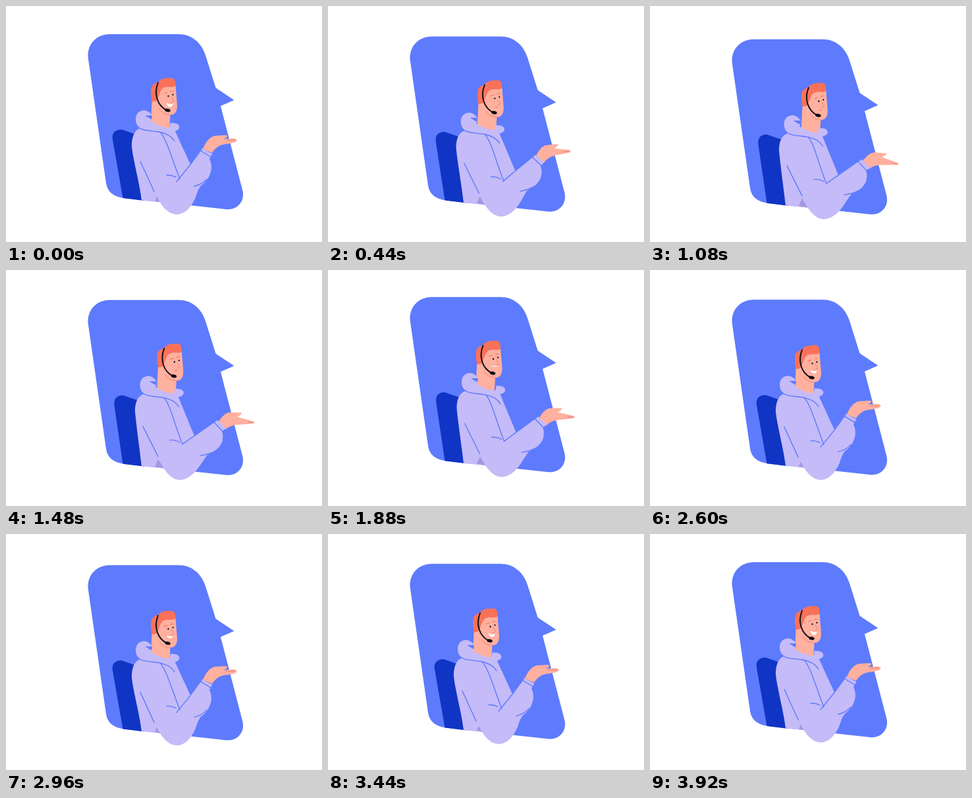
Write an HTML page with a canvas that moves like this. It is 480 px wide and 360 px high and loops after 3.96 s.

```html
<!DOCTYPE html>
<html lang="en">
<head>
<meta charset="utf-8">
<title>Support agent</title>
<style>
  html, body { margin: 0; width: 480px; height: 360px; overflow: hidden; background: #fff; }
  canvas { display: block; }
</style>
</head>
<body>
<canvas id="stage" width="480" height="360"></canvas>
<script>
const LOOP = 3960;
const BLUE = '#5e7bfd', NAVY = '#1035c4', LILAC = '#c5bbf8', DUSK = '#a397e3';
const SKIN = '#ffb09f', HAIR = '#fa7159', SHADE = '#e9776a', BLACK = '#0b0b12';
const ctx = document.getElementById('stage').getContext('2d');
ctx.lineCap = ctx.lineJoin = 'round';

// Keyframe pairs [time, value], sine-eased between neighbours.
const tracks = {
  bob:   [[0, 0], [960, 8], [1960, -2], [3000, 4.4], [LOOP, 0]],
  reach: [[0, 0], [680, 1], [1760, 1], [2400, 0], [LOOP, 0]],
  headX: [[0, 0], [680, 9.5], [1300, 10], [2400, 0], [LOOP, 0]],
  headY: [[0, 0], [1880, 0], [2400, 2.5], [3000, 3], [3800, 0], [LOOP, 0]],
  wrist: [[0, 0], [420, -9], [1040, 0], [1780, -6], [2300, 0], [LOOP, 0]],
  smile: [[0, 1], [300, 0], [1700, 0], [2200, 1], [2960, 0.6], [3700, 1], [LOOP, 1]]
};

function sample(keys, t) {
  const i = keys.findIndex(k => k[0] > t);
  const [t0, a] = keys[i - 1], [t1, b] = keys[i];
  return a + (b - a) * (1 - Math.cos(Math.PI * (t - t0) / (t1 - t0))) / 2;
}

// Blends two path strings that share the same commands.
function morph(from, to, k) {
  const ends = to.match(/[\d.]+/g);
  let i = 0;
  return from.replace(/[\d.]+/g, n => +n + (ends[i++] - n) * k);
}

function fill(path, color) {
  ctx.fillStyle = color;
  ctx.fill(new Path2D(path));
}

function line(path, color = BLUE, width = 1.4) {
  ctx.strokeStyle = color;
  ctx.lineWidth = width;
  ctx.stroke(new Path2D(path));
}

function oval(x, y, rx, ry, color, angle = 0) {
  ctx.fillStyle = color;
  ctx.beginPath();
  ctx.ellipse(x, y, rx, ry, angle, 0, 7);
  ctx.fill();
}

function shifted(x, y, paint) {
  ctx.save();
  ctx.translate(x, y);
  paint();
  ctx.restore();
}

function drawHead(smile) {
  fill('M222 138L220 178C228 186 240 189 248 189L250 160Z', SKIN);
  fill('M229 126L257.5 121L260 152C260 160 257 166 250 166C240 165 230 154 227 140Z', SKIN);
  line('M233 157C237 163 242 166 249 166', SHADE, 0.8);
  fill('M222 146C220 138 219 126 222 121.5C224 119 227 117.5 231 116C234 112 240 109.5 247 110C252 109 256 110 257 115L257.5 122C251 126 245 121 239 125C233 129 232 140 228 145Z', HAIR);
  line('M240.5 133.5L245 132M250 130.5L254 129.5', HAIR, 1.2);
  line('M251 139C253 142 256 145 254 146L251 147', SHADE, 0.9);
  oval(246.5, 137.5, 1.1, 1.3, BLACK);
  oval(253.5, 135.3, 1, 1.2, BLACK);
  if (smile < 0.1) line('M247 151L251 150.5', SHADE, 0.9);
  shifted(0, 147.5, () => {
    ctx.scale(1, smile);
    fill('M243.5 0C247 2 249 3 253.5 1.5C253 9 245 8 243.5 0Z', '#fff');
  });
  line('M231 117C224 134 230 152 244 159', BLACK, 1.9);
  oval(245.5, 159.2, 4.4, 2.4, BLACK, 0.2);
}

function drawHood() {
  fill('M222 167C214 154 197 158 197 173C197 184 205 188 216 190C235 191 246 193 256 191C266 189 265 181 258 179L250 178L248 186C238 185 228 181 221 176Z', LILAC);
  fill('M211 167L222 167L221 173Z', BLUE);
  line('M204 187C213 191 222 190 232 192C244 194 251 198 256 206');
}

function drawHand(reach, wrist) {
  const x = 306 + 20 * reach, y = 220 + 16 * reach;
  shifted(x, y, () => {
    ctx.rotate(wrist * Math.PI / 180);
    ctx.translate(-x, -y);
    fill(morph(
      'M299 218C303 208 309 200 317 198L334 197C338 198 336 201 330 203L346 202C352 203 352 207 346 208.5L336 210.5C326 211 320 214 313 224Z',
      'M320 232C326 226 331 217 340 215.5L358 217C361 218 358 221 352 223L373 230.5C379 232 379 234.5 374 235L356 235C348 235 341 235 333 241Z',
      reach), SKIN);
    line(morph('M335 205L348 204.5', 'M368 232L376 233.5', reach), SHADE, 0.9);
  });
}

function drawBody(reach) {
  const blend = (a, b) => morph(a, b, reach);
  fill(blend(
    'M207 186C194 187 191 202 191 214C193 235 203 270 206 296.5L240 300L285 290L292 262L280 241.5L256 189Z',
    'M212 186C198 188 196 203 196 213C198 235 203 270 206 296.5L240 300L291 290L299 262L286 250L261 189Z'), LILAC);
  fill(blend('M229 290L226 297.5L234 299Z', 'M231 286L226 297.5L240 299.5Z'), DUSK);
  fill(blend(
    'M215 240L229 290C235 303 245 318 260 318C275 317 283 303 288 292C290 284 293 278 296 274C306 268 312 255 312 246C312 240 310 235 309 233L313.5 225.5L297.5 217L280 241.5L255 200Z',
    'M220 238L233 287C239 301 250 317.5 264 317.5C279 317 289 304 295 295C299 289 303 283 306 279C318 275 329 264 329 255C330 249 329 246 328 244L334 238L321 226L286 250L261 200Z'), LILAC);
  line(blend('M204 237L225 283', 'M208 236L231 282'));
  line(blend('M233 191C243 200 252 233 264 264', 'M240 192C250 203 258 240 268 263'));
  line(blend('M244 258C249 258 254 259 258 261', 'M249 257C254 256 260 258 264 260'));
  line(blend('M259 268L280 242L297 218.5', 'M268 263L286 250.5L320 226.5'));
  line(blend('M293.5 219.5L311 230', 'M316 229.5L329.5 244'));
  line(blend('M286 275C294 273 301 269 305 264', 'M295 280.5C304 279 312 277 318 273.5'));
}

function render(t) {
  const at = name => sample(tracks[name], t);
  const reach = at('reach');
  ctx.fillStyle = '#fff';
  ctx.fillRect(0, 0, 480, 360);
  shifted(0, at('bob'), () => {
    fill('M158 43L262 43C282 43 297 56 303 75L318.5 124.5L321 126.5L346.5 143.5L326 152.5L359 280C364 297 352 312 334 310L179 293C164 291 154 284 152 270L125 81C122 60 136 43 158 43Z', BLUE);
    fill(morph(
      'M177.5 293L162 204C160 193 167 188 176 188.5L200 197L210 297Z',
      'M177.5 293L164.5 204C163 193 169 188 178 188.5L203 197L210 297Z', reach), NAVY);
    drawHand(reach, at('wrist'));
    drawBody(reach);
    shifted(at('headX'), at('headY'), () => drawHead(at('smile')));
    shifted(6.5 * reach, 0, drawHood);
  });
}

function tick(now) {
  render(now % LOOP);
  requestAnimationFrame(tick);
}
requestAnimationFrame(tick);
</script>
</body>
</html>
```
